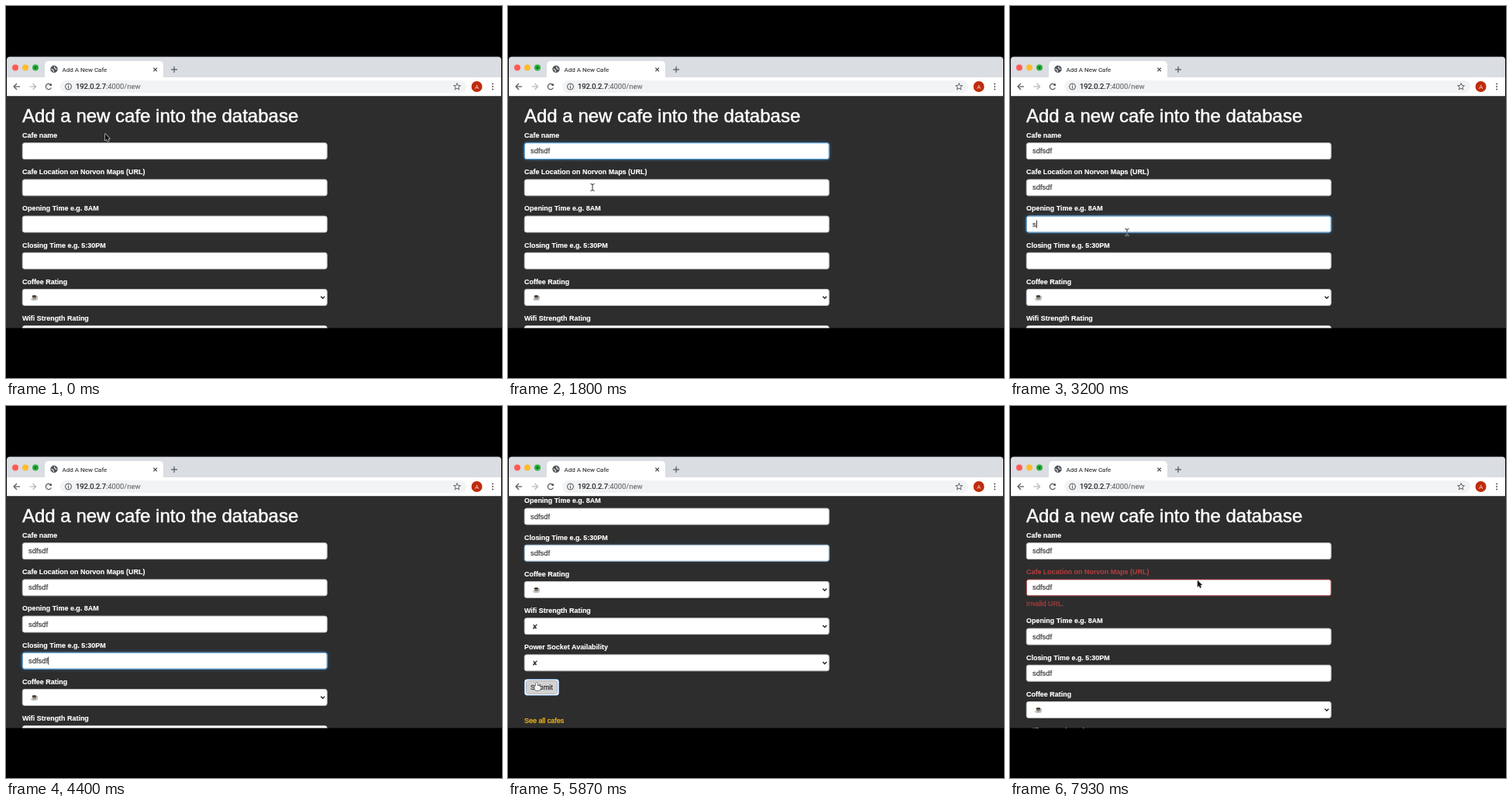
Animation of 640 by 480 pixels, one loop 8000 ms. Source, as an HTML page with a canvas:

```html
<!DOCTYPE html>
<html lang="en">
<head>
<meta charset="utf-8">
<title>Add A New Cafe</title>
<style>
html, body { margin: 0; width: 100%; height: 100%; overflow: hidden; background: #000; }
canvas { display: block; }
</style>
</head>
<body>
<canvas id="stage" width="640" height="480"></canvas>
<script>
const c = document.getElementById('stage').getContext('2d');
const SANS = '"Liberation Sans", Arial, sans-serif';
const UI = 'Roboto, Inter, sans-serif';
const INK = '#505459', ERROR = '#ab3d3d';
const LOOP = 8000, CLICK = 5780, RELOAD = 6070, SCROLL = 139;
const LEFT = 21, WIDTH = 393.5, HEIGHT = 21.5, PITCH = 47.2;
const LABELS = ['Cafe name', 'Cafe Location on Norvon Maps (URL)', 'Opening Time e.g. 8AM',
  'Closing Time e.g. 5:30PM', 'Coffee Rating', 'Wifi Strength Rating', 'Power Socket Availability'];
const INPUTS = 4, ENTRY = 'sdfsdf';

// pointer moves: start, end, x, y
const MOVES = [[70, 400, 109, 186], [1150, 1400, 109, 234], [2250, 2530, 151, 292],
  [3300, 3530, 177, 333], [5050, 5600, 37, 357], [6090, 6400, 399, 344], [7600, 7930, 242, 225]];

const clamp = v => Math.max(0, Math.min(1, v));
const progress = (t, from, to) => clamp((t - from) / (to - from));
const ease = v => v * v * (3 - 2 * v);
const focusTime = i => i < INPUTS ? 850 + 1020 * i : CLICK;
const typingTime = i => focusTime(i) + 285;

function paint(fill, stroke, width = 1) {
  c.lineWidth = width;
  if (stroke) { c.strokeStyle = stroke; c.stroke(); }
  if (fill) { c.fillStyle = fill; c.fill(); }
}
function box(x, y, w, h, r, fill, stroke) {
  c.beginPath();
  c.roundRect(x, y, w, h, r);
  paint(fill, stroke);
}
function oval(x, y, rx, ry, fill, stroke) {
  c.beginPath();
  c.ellipse(x, y, rx, ry, 0, 0, 7);
  paint(fill, stroke);
}
function arc(x, y, r, from, to, color) {
  c.beginPath();
  c.arc(x, y, r, from, to);
  paint(null, color, 1.2);
}
function line(points, color, width = 1.2, fill) {
  c.beginPath();
  points.forEach(p => c.lineTo(...p));
  if (fill) c.closePath();
  paint(fill, color, width);
}
// a thin outline gives the slightly heavier text of the page
function text(str, x, y, font, color, weight = 0.25) {
  c.font = font;
  c.fillStyle = c.strokeStyle = color;
  c.lineWidth = weight;
  c.fillText(str, x, y);
  if (weight) c.strokeText(str, x, y);
}
function cross(x, y, r, angle) {
  for (const a of [angle, angle + Math.PI / 2]) {
    const dx = r * Math.cos(a), dy = r * Math.sin(a);
    line([[x - dx, y - dy], [x + dx, y + dy]], INK);
  }
}
function star(x, y) {
  const corners = Array.from({ length: 11 }, (_, i) => {
    const a = (i / 5 - 0.5) * Math.PI, r = i % 2 ? 2 : 4.6;
    return [x + r * Math.cos(a), y + r * Math.sin(a)];
  });
  line(corners, INK, 0.9);
}
function navArrow(x, dir, color) {
  line([[x - 4, 104], [x + 4, 104]], color);
  line([[x, 100], [x + 4 * dir, 104], [x, 108]], color);
}

function browser(t) {
  box(1, 65.4, 638, 30, [4, 4, 0, 0], '#dadde2');
  ['#fc5b57', '#fdbc2e', '#28b03c'].forEach((color, i) => oval(12 + 13 * i, 79.5, 4, 4, color));
  oval(38, 79.5, 1.5, 1.5, '#0d6a1c');
  box(50, 71, 153, 24, [5, 5, 0, 0], '#fff');
  box(1, 92, 638, 24.5, 0, '#fff');

  if (t > 5940 && t < 6400) {
    arc(62, 81.5, 4, t / 110, t / 110 + 4.2, '#4a8af4');
  } else {
    oval(62, 81.5, 4.7, 4.7, INK);
    arc(59, 84, 2.4, -1.8, 0.6, '#dfe1e3');
    arc(65, 79, 2.4, 1.4, 3.6, '#dfe1e3');
  }
  text('Add A New Cafe', 72.5, 84.5, '8px ' + UI, '#303236', 0.1);
  cross(192.6, 82, 3.2, Math.PI / 4);
  cross(217, 82, 4, 0);

  navArrow(14, -1, INK);
  navArrow(34.5, 1, '#b4b7bb');
  arc(55, 104, 3.6, 0.4, 5.5, INK);
  box(56.4, 100.4, 2.6, 2.6, 0, INK);

  box(70, 96, 524, 16, 8, '#f1f3f4');
  oval(80.5, 104, 4, 4, null, INK);
  box(80, 103, 1, 3.4, 0, INK);
  box(80, 101.3, 1, 1, 0, INK);
  const host = '192.0.2.7', font = '9.4px ' + UI;
  text(host, 90, 107.4, font, '#17181a', 0.2);
  text(':4000/new', 90 + c.measureText(host).width, 107.4, font, '#65696d', 0.1);
  star(582, 104.2);
  oval(607.5, 104, 7, 7, '#bf2c0b');
  text('A', 604.9, 107, '8px ' + UI, '#f6d5cc', 0);
  for (let y = 100.4; y < 108; y += 3.6) oval(628, y, 1, 1, INK);
}

function cup(x, y) {
  oval(x, y + 2.4, 4, 1.2, '#d0d0d0', '#999');
  oval(x + 2.8, y, 1.4, 1.2, null, '#999');
  box(x - 2.8, y - 2, 5.6, 4.4, [0, 0, 2.8, 2.8], '#8a8580');
  oval(x, y - 1.6, 2.8, 1.1, '#35200f');
}

const fieldTop = (i, view) => 176.4 + i * PITCH - view.scroll + (i > 1 ? view.shift : 0);

function field(i, t, view) {
  const y = fieldTop(i, view), mid = y + HEIGHT / 2;
  const bad = view.failed && i === 1;
  const isInput = i < INPUTS;
  const from = focusTime(i), to = focusTime(i + 1);
  const glow = isInput ? progress(t, from, from + 150) - progress(t, to, to + 150) : 0;
  const frame = (fill, stroke) => box(LEFT + 0.3, y + 0.3, WIDTH - 0.6, HEIGHT - 0.6, 2.6, fill, stroke);

  text(LABELS[i], LEFT, y - 6.4, 'bold 8.95px ' + SANS, bad ? ERROR : '#fff', 0.15);
  c.save();
  c.shadowColor = `rgba(60, 150, 220, ${0.6 * glow})`;
  c.shadowBlur = 5;
  frame('#fff');
  c.restore();
  frame(null, bad ? ERROR : '#c4c4c4');
  c.globalAlpha = glow;
  frame(null, '#4a9bd9');
  c.globalAlpha = 1;

  if (isInput) {
    const typed = ENTRY.slice(0, Math.max(0, Math.ceil((t - typingTime(i)) / 40)));
    text(typed, 29, mid + 3, '9.4px ' + SANS, '#444');
    const caret = t >= from && t < Math.min(to, from + 820) || i === 3 && t >= from && t < to;
    if (caret) box(29.3 + c.measureText(typed).width, mid - 5, 0.9, 10, 0, '#222');
    return;
  }
  if (i === INPUTS) cup(36.5, mid);
  else text('✘', 31, mid + 3.4, '9px "DejaVu Sans", sans-serif', '#333', 0);
  line([[406.2, mid - 1.2], [408.7, mid + 1.4], [411.2, mid - 1.2]], '#222', 1.4);
}

const buttonTop = view => 491.2 - view.scroll + view.shift;

function submitButton(t, view) {
  const y = buttonTop(view);
  if (t >= CLICK && t < RELOAD) {
    box(LEFT + 0.5, y + 0.5, 44, HEIGHT - 1, 3, '#fff', '#3478cf');
    box(LEFT + 2.5, y + 2.5, 40, HEIGHT - 5, 2, '#d2d2d2', '#8c8c8c');
  } else {
    box(LEFT + 0.3, y + 0.3, 44.4, HEIGHT - 0.6, 2.6, '#fff', '#ccc');
  }
  text('Submit', 29, y + 13.9, '9.3px ' + SANS, '#333');
}

function page(t, view) {
  c.save();
  c.beginPath();
  c.rect(0, 116.5, 640, 299);
  c.clip();
  c.fillStyle = '#2d2d2d';
  c.fillRect(0, 116, 640, 300);

  text('Add a new cafe into the database', LEFT, 150.3 - view.scroll, '24px ' + SANS, '#fff', 0.5);
  LABELS.forEach((_, i) => field(i, t, view));
  if (view.failed) text('Invalid URL.', LEFT, 258.2, '8.9px ' + SANS, ERROR);
  submitButton(t, view);
  text('See all cafes', LEFT, buttonTop(view) + 56.3, '8.95px ' + SANS, '#fdbd14');

  c.globalAlpha = progress(t, 4715, 4745) - progress(t, 5540, 5600);
  box(636, 117 + view.scroll * 0.683, 4, 204, 2, '#8e8e8e');
  c.restore();
}

function pointerAt(t) {
  let x = 128, y = 165;
  for (const [from, to, toX, toY] of MOVES) {
    const p = ease(progress(t, from, to));
    x += (toX - x) * p;
    y += (toY - y) * p;
  }
  return [x, y];
}

function textBeam(color, width) {
  line([[0, -4], [0, 4]], color, width);
  for (const s of [-1, 1]) line([[-2.6, 4.6 * s], [0, 3.6 * s], [2.6, 4.6 * s]], color, width);
}
function hand() {
  for (const [fill, stroke] of [[null, '#222'], ['#f4f4f4', null]]) {
    box(-1.4, 0, 2.4, 8, 1.2, fill, stroke);
    box(-2.8, 4, 8, 6, 2.4, fill, stroke);
  }
}

function pointer(t, view) {
  if (t > typingTime(3) && t < MOVES[4][0]) return;   // hidden while typing
  const [x, y] = pointerAt(t);
  const over = (top, right) => x > LEFT && x < right && y > top + 2 && y < top + HEIGHT + 0.5;
  const overInput = LABELS.some((_, i) => i < INPUTS && over(fieldTop(i, view), LEFT + WIDTH));
  c.save();
  c.translate(x, y);
  c.lineJoin = 'round';
  if (overInput) {
    textBeam('rgba(255, 255, 255, .6)', 2);
    textBeam('#333', 1);
  } else if (over(buttonTop(view), 66)) {
    hand();
  } else {
    line([[0, 0], [0, 8.4], [1.9, 6.7], [3.2, 9.7], [4.7, 9], [3.4, 6.2], [5.9, 6]], '#c8c8c8', 1.4, '#111');
  }
  c.restore();
}

function draw(now) {
  const t = now % LOOP;
  const failed = t >= RELOAD;
  const scroll = failed ? 0 : SCROLL * (1 - (1 - progress(t, 4722, 5572)) ** 2);
  const view = { failed, scroll, shift: failed ? 16 : 0 };
  c.clearRect(0, 0, 640, 480);
  browser(t);
  page(t, view);
  pointer(t, view);
  requestAnimationFrame(draw);
}
requestAnimationFrame(draw);
</script>
</body>
</html>
```
